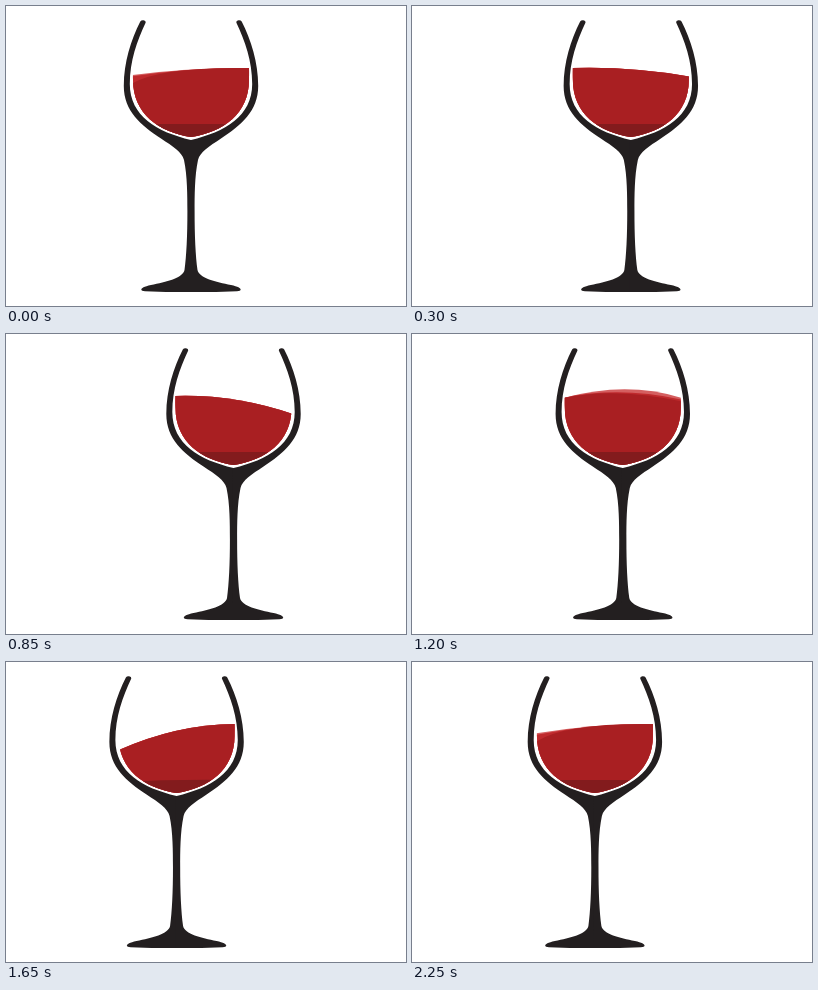
These frames come from a looping animation (400 by 300 pixels, 2.3 s). An HTML page:

```html
<!DOCTYPE html>
<html lang="en">
<head>
<meta charset="utf-8">
<title>Swirling wine glass</title>
<style>
  html, body { margin: 0; width: 100%; height: 100%; overflow: hidden; background: #fff; }
  svg { display: block; width: 100vw; height: 100vh; }
</style>
</head>
<body>
<svg viewBox="0 0 400 300">
  <defs>
    <clipPath id="bowl">
      <path d="M-57.5 50C-58 60-58.3 66-58 74C-58 108-32 126 0 131C32 126 58 108 58 74C58.3 66 58 60 57.5 50Z"/>
    </clipPath>
    <path id="half" d="M-50.7 15.5C-60 34-67.2 56-67.2 80C-67.2 105-50 119.5-30 132.5C-18 140.5-9 146-7 154C-3.6 170-3.6 190-3.6 205C-3.6 230-4.6 250-6.5 264C-8 272-25 276-40 279C-47 280.5-49.7 282-49.7 283.8Q-49.5 285-46 285.2L-25 286H1V134H0C-34 126-61.2 110-61.2 78C-61.2 55-54 35-45.3 16.5Q-45 14.5-47.5 14.2Q-49.8 14-50.7 15.5Z"/>
  </defs>
  <g id="glass">
    <g clip-path="url(#bowl)">
      <path id="back" fill="#d45f60"/>
      <path id="middle" fill="#bf2a2d"/>
      <path id="front" fill="#a91f22"/>
      <path id="base" fill="#831b1d"/>
    </g>
    <g fill="#231f20">
      <use href="#half"/>
      <use href="#half" transform="scale(-1 1)"/>
    </g>
  </g>
</svg>
<script>
const LOOP = 2300, STEP = 50;
const el = id => document.getElementById(id);
const glass = el('glass');

const easeIn = u => u ** 1.5;
const easeOut = p => u => 1 - (1 - u) ** p;

// start ms, end ms, from x, to x, easing: a quick swing, then a slow drift back
const swings = [
  [0, 650, 185, 230.5, easeOut(2.2)],
  [650, 1150, 230.5, 218.7, easeIn],
  [1150, 1750, 218.7, 169.2, easeOut(2)],
  [1750, 2300, 169.2, 185, easeIn]
];

function glassX(t) {
  const [a, b, from, to, ease] = swings.find(s => t < s[1]);
  return from + (to - from) * ease((t - a) / (b - a));
}

function pour(id, left, cx, cy, right) {
  el(id).setAttribute('d', `M-58.5 ${left}Q${cx} ${cy} 58.5 ${right}V140H-58.5Z`);
}

function draw(t) {
  const x = glassX(t), d = x - 203;
  const tilt = 1.08 * Math.max(0, Math.abs(d) - 8);
  const dome = Math.exp(-(((d - 2) / 10) ** 4));
  const rim = Math.exp(-(((d + 19) / 6) ** 2));
  const level = 62 + 2 * dome;
  const left = level + (d < 0 ? tilt : 0);
  const right = level + (d > 0 ? tilt : 0);
  const top = 61 - 16 * dome - 0.05 * (right - left);
  const lean = Math.max(0, -d - 22) * 0.2;

  glass.setAttribute('transform', `translate(${x} 0)`);
  pour('back', left - 4 * rim, 4 * dome, top, right);
  pour('middle', left - 2.5 * rim, -4 * dome, top + 6 * dome, right + 2 * dome);
  pour('front', left + 4.5 * rim, -8 * dome - 30 * rim, top + 7 * dome - rim, right + 4 * dome);
  pour('base', 118 + lean, 0, 118 - lean / 2, 118);
}

const start = performance.now();
function tick() {
  const t = (performance.now() - start) % LOOP;
  draw(Math.floor(t / STEP) * STEP);
  requestAnimationFrame(tick);
}
tick();
</script>
</body>
</html>
```
